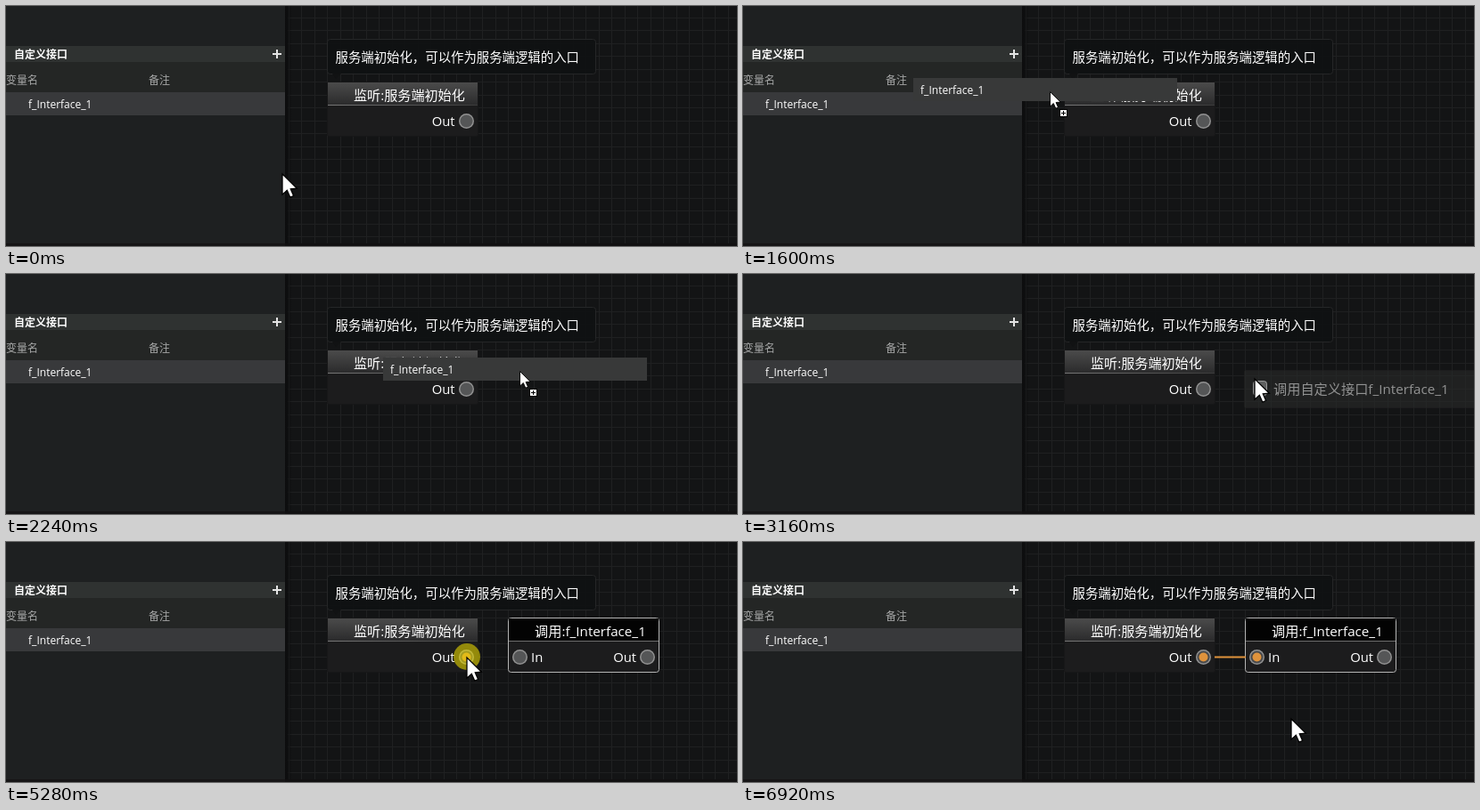
An HTML page with a canvas that plays this animation: 820 by 270 pixels, repeating every 7680 ms.

```html
<!DOCTYPE html>
<html lang="zh">
<head>
<meta charset="utf-8">
<style>
html, body { margin: 0; width: 820px; height: 270px; overflow: hidden; background: #121314; }
canvas { display: block; }
</style>
</head>
<body>
<canvas id="stage" width="820" height="270"></canvas>
<script>
const ctx = document.getElementById('stage').getContext('2d');
const LOOP = 7680, STEP = 40, GRID = 14.5;
const FONT = '"Open Sans", "Noto Sans CJK SC", "Noto Sans CJK", sans-serif';
const ORANGE = '#e0933c', WHITE = '#fff';

const START = { x: 310, y: 189 };
const linear = k => k;
const easeOut = k => k * (2 - k);
const smooth = k => k * k * (3 - 2 * k);

// Each move runs from the previous resting point to x, y
const MOVES = [
  { from: 440, to: 1000, x: 170, y: 113, ease: smooth },
  { from: 1320, to: 1600, x: 345, y: 97, ease: linear },
  { from: 1600, to: 2040, x: 590, y: 112, ease: easeOut },
  { from: 2120, to: 2360, x: 563, y: 108, ease: linear },
  { from: 3110, to: 3320, x: 589, y: 131, ease: easeOut },
  { from: 4400, to: 4680, x: 517, y: 130, ease: smooth },
  { from: 5280, to: 6000, x: 575, y: 130, ease: smooth },
  { from: 6560, to: 6920, x: 615, y: 199, ease: smooth }
];

function pointerAt(t) {
  let { x, y } = START;
  for (const move of MOVES) {
    const progress = Math.min(1, Math.max(0, (t - move.from) / (move.to - move.from)));
    const k = move.ease(progress);
    x += (move.x - x) * k;
    y += (move.y - y) * k;
  }
  return [Math.round(x), Math.round(y)];
}

function rect(x, y, w, h, fill) {
  ctx.fillStyle = fill;
  ctx.fillRect(x, y, w, h);
}

function box(x, y, w, h, r, fill, stroke) {
  ctx.beginPath();
  ctx.roundRect(x + .5, y + .5, w - 1, h - 1, r);
  ctx.fillStyle = fill;
  ctx.fill();
  ctx.lineWidth = 1;
  ctx.strokeStyle = stroke;
  ctx.stroke();
}

function disc(x, y, r, fill) {
  ctx.beginPath();
  ctx.arc(x, y, r, 0, Math.PI * 2);
  ctx.fillStyle = fill;
  ctx.fill();
}

function text(str, x, y, size, color = WHITE, weight = 400, align = 'left') {
  ctx.font = `${weight} ${size}px ${FONT}`;
  ctx.textAlign = align;
  ctx.fillStyle = color;
  ctx.fillText(str, x, y);
}

function gradient(x0, y0, x1, y1, from, to) {
  const g = ctx.createLinearGradient(x0, y0, x1, y1);
  g.addColorStop(0, from);
  g.addColorStop(1, to);
  return g;
}

function drawPanel() {
  rect(0, 0, 313, 270, '#1e2021');
  rect(0, 45, 313, 18, '#2f3231');
  rect(0, 63, 313, 34, '#242625');
  rect(0, 97, 313, 26, '#38393b');
  rect(0, 267, 313, 3, '#161516');
  text('自定义接口', 9, 59, 12, WHITE, 700);
  rect(299, 53, 10, 2, '#e4e4e4');
  rect(303, 49, 2, 10, '#e4e4e4');
  text('变量名', 0, 88, 12, '#a8a9a9');
  text('备注', 160, 88, 12, '#a8a9a9');
  text('f_Interface_1', 25, 115, 12);
}

function drawGrid() {
  rect(313, 0, 507, 270, '#131415');
  for (let x = 360 - 3 * GRID; x < 820; x += GRID) rect(Math.round(x), 0, 1, 270, '#1f2021');
  for (let y = 85 % GRID; y < 270; y += GRID) rect(316, Math.round(y), 504, 1, '#1f2021');
  rect(313, 0, 8, 270, gradient(313, 0, 321, 0, 'rgba(10,10,11,.8)', 'rgba(10,10,11,0)'));
  rect(313, 267, 507, 3, '#111011');
}

function drawPort(x, lit) {
  disc(x, 129.5, 8.5, '#929292');
  disc(x, 129.5, 7, lit ? '#494a4c' : '#555657');
  if (lit) disc(x, 129.5, 5, ORANGE);
}

function drawListener(lit) {
  box(360, 37, 302, 40, 3, 'rgba(16,17,18,.92)', '#252627');
  ctx.beginPath();
  ctx.moveTo(366, 76);
  ctx.lineTo(370, 82);
  ctx.lineTo(376, 76);
  ctx.fillStyle = '#111213';
  ctx.fill();
  text('服务端初始化，可以作为服务端逻辑的入口', 369.5, 63, 14.4);

  box(360, 85, 170, 62, 2, '#1c1c1d', '#171718');
  rect(361, 86, 168, 25, gradient(0, 86, 0, 111, '#4b4b4b', '#2b2b2c'));
  rect(361, 111, 168, 1, gradient(361, 0, 529, 0, '#777', '#3c3c3c'));
  text('监听:服务端初始化', 390, 106, 15.1);
  text('Out', 503.5, 135, 14.8, WHITE, 400, 'right');
  drawPort(516.5, lit);
}

function drawCaller(lit) {
  box(563, 85, 170, 62, 3, '#1c1c1d', '#b4b4b4');
  rect(564, 86, 168, 25, '#030303');
  rect(564, 111, 168, 1, '#6e6e6e');
  text('调用:f_Interface_1', 593, 106, 15.2);
  drawPort(576.5, lit);
  text('In', 589, 135, 14.8);
  text('Out', 707, 135, 14.8, WHITE, 400, 'right');
  drawPort(719.5, false);
}

function drawMenu(alpha) {
  ctx.save();
  ctx.globalAlpha = alpha;
  box(562, 108, 262, 43, 1, '#292a2a', '#202121');
  box(572, 120, 16, 17, 3, '#8a8a8a', '#d0d0d0');
  text('调用自定义接口f_Interface_1', 595, 135, 15.2, '#ddd');
  ctx.restore();
}

function drawArrow(x, y, scale) {
  const outline = [[0, 0], [0, 16.5], [3.8, 13], [6.3, 18.7], [9, 17.5], [6.6, 12], [11.7, 11.6]];
  ctx.save();
  ctx.translate(x, y);
  ctx.scale(scale, scale);
  ctx.beginPath();
  outline.forEach(point => ctx.lineTo(...point));
  ctx.closePath();
  ctx.fillStyle = WHITE;
  ctx.strokeStyle = '#000';
  ctx.lineWidth = .9;
  ctx.fill();
  ctx.stroke();
  ctx.restore();
}

function drawDrag(x, y) {
  rect(x - 154, y - 16, 296, 26, '#383939');
  text('f_Interface_1', x - 146, y + 2, 12);
  drawArrow(x - .5, y - .5, 1);
  rect(x + 10, y + 19, 9, 9, '#000');
  rect(x + 11, y + 20, 7, 7, WHITE);
  rect(x + 12, y + 23, 5, 1, '#000');
  rect(x + 14, y + 21, 1, 5, '#000');
}

function draw(t) {
  const within = (from, to) => t >= from && t < to;
  const [x, y] = pointerAt(t);
  drawGrid();
  drawPanel();
  drawListener(t >= 5280);
  if (t >= 3840) drawCaller(t >= 6000);

  const wireEnd = t >= 6120 ? 564 : x;
  if (t >= 5280 && wireEnd > 529) rect(529, 128.5, wireEnd - 529, 2, ORANGE);
  if (within(2760, 3840)) drawMenu(t < 3120 ? .2 : Math.min(1, .6 + (t - 3160) / 400));

  if (within(1440, 2720)) {
    drawDrag(x, y);
    return;
  }
  const pressed = within(1320, 1400) || within(3640, 3680) || within(5280, 5360);
  if (pressed) disc(x, y - 1, 15, 'rgba(228,212,0,.6)');
  drawArrow(x, y, 1.4);
}

function tick(now) {
  draw(Math.floor(now % LOOP / STEP) * STEP);
  requestAnimationFrame(tick);
}
requestAnimationFrame(tick);
</script>
</body>
</html>
```
